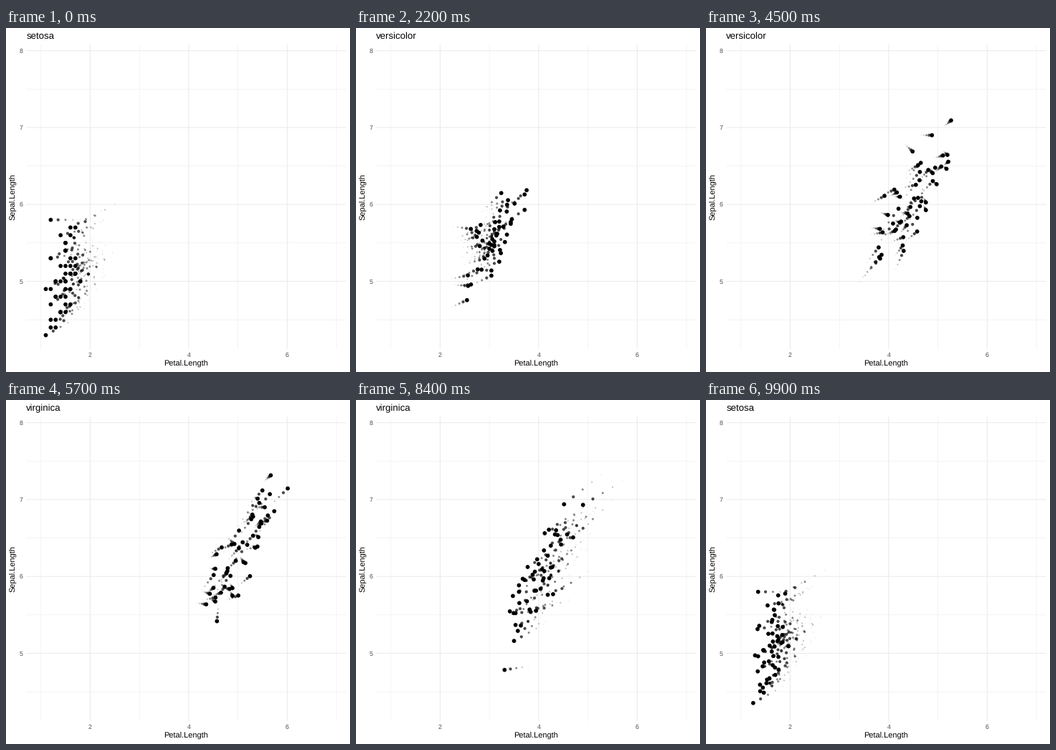
Animation of 480x480 px, one loop 10000 ms. Source, as a matplotlib script:

```python
import numpy as np
import matplotlib.pyplot as plt
from matplotlib.animation import FuncAnimation

SIZE, DPI, FRAMES = 480, 96, 100
PX = 72 / DPI  # points per pixel
COUNT = 50
WAKE = 4

rng = np.random.default_rng(11)
plt.rcParams.update({"font.family": "Liberation Sans", "text.hinting": "none"})

# Per species: mean, spread, lower and upper bound of (petal, sepal), correlation
SPECIES = {
    "setosa": ((1.46, 5.01), (0.17, 0.35), (1.0, 4.4), (1.9, 5.7), 0.27),
    "versicolor": ((4.26, 5.94), (0.47, 0.52), (3.3, 5.0), (5.1, 7.0), 0.75),
    "virginica": ((5.55, 6.59), (0.55, 0.64), (4.8, 5.6), (6.7, 7.7), 0.86),
}
NAMES = list(SPECIES)

# Outliers: (petal, sepal) in each species along one path
KEYS = np.array([
    [(1.4, 4.6), (4.7, 6.3), (4.5, 4.9)],
    [(1.5, 5.0), (3.3, 4.9), (6.3, 7.3)],
    [(1.1, 4.3), (4.7, 6.1), (5.0, 5.7)],
    [(1.2, 5.8), (3.6, 5.6), (5.1, 5.8)],
    [(1.7, 5.7), (4.5, 6.2), (6.9, 7.7)],
    [(1.5, 5.4), (3.7, 5.5), (6.4, 7.9)],
])


def to_px(petal, sepal):
    return 117.4 + (petal - 2) * 68.74, 31.6 + (8 - sepal) * 107.3


def cloud(mean, spread, low, high, corr):
    """Evenly spread correlated normal points on a 0.1 grid."""
    n = COUNT - len(KEYS)
    z = np.quantile(rng.normal(size=5000), (np.arange(n) + 0.5) / n)
    sepal = rng.permutation(z)
    petal = corr * sepal + np.sqrt(1 - corr ** 2) * rng.permutation(z)
    pts = np.array(mean) + np.array(spread) * np.column_stack([petal, sepal])
    return np.clip(pts, low, high).round(1)


states = []
for i, name in enumerate(NAMES):
    pts = np.vstack([KEYS[:, i], cloud(*SPECIES[name])])
    states.append(np.column_stack(to_px(*pts.T)))


def phase(frame):
    return np.interp(frame % FRAMES, [0, 6, 33, 40, 67, 74, 100],
                     [0, 0, 1, 1, 2, 2, 3])


def positions(frame):
    t = phase(frame)
    i = int(t)
    a, b = states[i % 3], states[(i + 1) % 3]
    return a + (b - a) * (t - i)


fig = plt.figure(figsize=(SIZE / DPI, SIZE / DPI), dpi=DPI, facecolor="white")
ax = fig.add_axes([0, 0, 1, 1])
ax.set(xlim=(0, SIZE), ylim=(SIZE, 0))
ax.axis("off")

LEFT, RIGHT, TOP, BOTTOM = 28.4, 474.5, 23.1, 448.1


def grid(petals, sepals, width):
    style = dict(color="#ebebeb", lw=width * PX, solid_capstyle="butt",
                 snap=False, zorder=1)
    for v in petals:
        x = to_px(v, 0)[0]
        ax.plot([x, x], [TOP, BOTTOM], **style)
    for v in sepals:
        y = to_px(0, v)[1]
        ax.plot([LEFT, RIGHT], [y, y], **style)


def label(x, y, text, size, color="black", ha="center", **kw):
    return ax.text(x, y, text, fontsize=size * PX, color=color, ha=ha,
                   va="baseline", rotation_mode="anchor", **kw)


grid(range(1, 8, 2), np.arange(4.5, 8), 0.55)
grid(range(2, 7, 2), range(5, 9), 1.07)

for v in range(2, 7, 2):
    label(to_px(v, 0)[0], 459.3, str(v), 8.8, "#4d4d4d")
for v in range(5, 9):
    label(23.4, to_px(0, v)[1] + 3, str(v), 8.8, "#4d4d4d", "right")
label(251.4, 472, "Petal.Length", 11)
label(13.4, 235.6, "Sepal.Length", 11, rotation=90)
title = label(28.4, 15.2, NAMES[0], 13.2, ha="left")

# Oldest echo first, live points last
fade = np.repeat(np.arange(1, WAKE + 2) / (WAKE + 1), COUNT)
radius = 0.72 + 2.16 * fade ** 2
colors = np.zeros((fade.size, 4))
colors[:, 3] = fade ** 1.5
dots = ax.scatter(np.zeros(fade.size), np.zeros(fade.size),
                  s=(2 * radius * PX) ** 2, c=colors, linewidths=0, zorder=3)


def update(frame):
    dots.set_offsets(np.vstack([positions(frame - k)
                                for k in range(WAKE, -1, -1)]))
    title.set_text(NAMES[int(phase(frame) + 0.5) % 3])
    return dots, title


anim = FuncAnimation(fig, update, frames=FRAMES, interval=100, repeat=True,
                     repeat_delay=0, blit=False)
plt.show()
```
